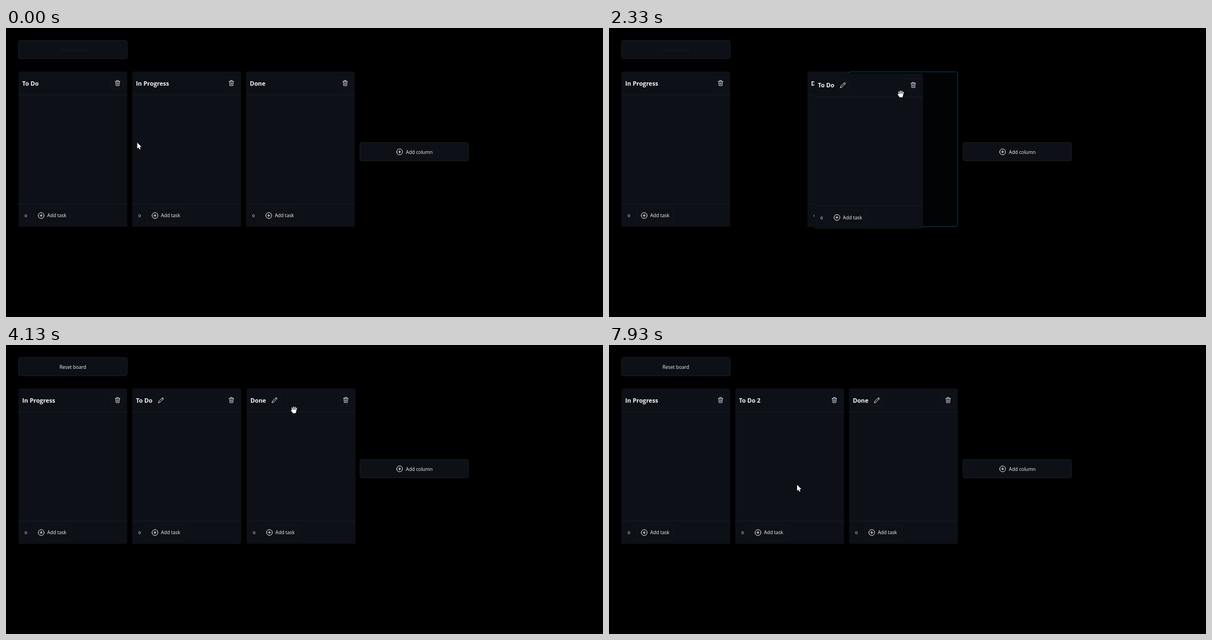
Recreate the animation shown at these times as an HTML page with a canvas. Size 1076 px wide and 521 px high, loop 8 s.

```html
<!DOCTYPE html>
<html lang="en">
<head>
<meta charset="utf-8">
<title>Task board</title>
<style>
html, body { margin: 0; width: 100%; height: 100%; overflow: hidden; background: #000; }
canvas { display: block; width: 100vw; height: 100vh; }
</style>
</head>
<body>
<canvas id="board" width="1076" height="521"></canvas>
<script>
const ctx = document.getElementById('board').getContext('2d');
const LOOP = 8000, STEP = 1000 / 15;
const FONT = '"Open Sans", "Noto Sans", sans-serif';
const TITLE = '700 10.8px ' + FONT, LABEL = '500 8.6px ' + FONT;
const PANEL = '#0d1117', LINE = '#171c23', EDGE = '#12171e', DIM = '#161b21', WHITE = '#f4f6f8';
const SLOT_X = 22.5, SLOT_W = 205.1, COL_Y = 78.5, COL_W = 196, COL_H = 280;

// Pointer path: time, x, y
const path = [
  [0, 236.5, 206.5], [70, 236.5, 206.5], [870, 150, 120], [1000, 178.5, 115.5], [1270, 178.5, 115.5],
  [1530, 243, 115], [1730, 302, 118.2], [2070, 404, 118], [2530, 578, 119.5], [2640, 578, 119.5],
  [2800, 517, 118], [3130, 294, 119.5], [3330, 294, 119.5], [3800, 519, 116], [4000, 519, 116],
  [4070, 519, 117], [4200, 519, 117], [4740, 287, 106], [4860, 287, 106], [5070, 313, 172],
  [6590, 313, 172], [7130, 387, 99], [7590, 387, 99], [7930, 339, 252], [8000, 339, 252]
];

// Column moves: time, slot
const columns = {
  todo: { moves: [[0, 0], [1660, 1], [2290, 2], [3530, 1]] },
  progress: { title: 'In Progress', moves: [[0, 1], [1660, 0]] },
  done: { title: 'Done', moves: [[0, 2], [2290, 1], [3530, 2]] }
};
const drags = [
  { id: 'todo', start: 1270, drop: 2630, from: 0, to: 2 },
  { id: 'done', start: 3330, drop: 3960, from: 1, to: 2 }
];
const DROP_MS = 250;
const EDIT_ON = 4795, EDIT_OFF = 7325;

const slotX = i => SLOT_X + i * SLOT_W;
const ease = p => 1 - Math.pow(1 - Math.min(1, Math.max(0, p)), 2.4);
const mix = (a, b, p) => a + (b - a) * p;
const within = (t, a, b) => t >= a && t < b;

// Monotone cubic through the path points
function track(t, k) {
  let i = 0;
  while (i < path.length - 2 && path[i + 1][0] <= t) i++;
  const rate = j => j < 0 || j > path.length - 2 ? 0 :
    (path[j + 1][k] - path[j][k]) / (path[j + 1][0] - path[j][0]);
  const slope = j => {
    const a = rate(j - 1), b = rate(j);
    return a * b > 0 ? 2 * a * b / (a + b) : 0;
  };
  const a = path[i], b = path[i + 1], h = b[0] - a[0], p = (t - a[0]) / h, q = 1 - p;
  return a[k] * (1 + 2 * p) * q * q + b[k] * (3 - 2 * p) * p * p
    + h * p * q * (slope(i) * q - slope(i + 1) * p);
}

function columnX(moves, t, snap) {
  let i = 0;
  while (i < moves.length - 1 && moves[i + 1][0] <= t) i++;
  const x = slotX(moves[i][1]);
  return i && !snap ? mix(slotX(moves[i - 1][1]), x, ease((t - moves[i][0]) / DROP_MS)) : x;
}

function box(x, y, w, h, fill, stroke, r = 3) {
  ctx.beginPath();
  ctx.roundRect(x, y, w, h, r);
  if (fill) { ctx.fillStyle = fill; ctx.fill(); }
  if (stroke) { ctx.strokeStyle = stroke; ctx.lineWidth = 1; ctx.stroke(); }
}

function text(str, x, y, font = LABEL, color = WHITE, align = 'left') {
  ctx.font = font;
  ctx.fillStyle = color;
  ctx.textAlign = align;
  ctx.fillText(str, x, y);
}

function strokePath(d, x, y, color = WHITE, width = 1) {
  ctx.save();
  ctx.translate(x, y);
  ctx.strokeStyle = color;
  ctx.lineWidth = width;
  ctx.lineCap = ctx.lineJoin = 'round';
  ctx.stroke(new Path2D(d));
  ctx.restore();
}

const icons = {
  trash: 'M-4.3 -3H4.3M-3.5 -3L-2.8 4.7H2.8L3.5 -3M-1.6 -3V-4.7H1.6V-3M-1.1 -1L-.9 2.8M1.1 -1L.9 2.8',
  pencil: 'M-4.7 4.7L-3.8 1.6L3 -4.5L4.7 -2.8L-1.8 3.8ZM1.6 -3.1L3.3 -1.4',
  check: 'M-3.7 .5L-1.3 3L3.7 -3',
  cross: 'M-3 -3L3 3M3 -3L-3 3',
  plus: 'M-5.3 0A5.3 5.3 0 1 0 5.3 0A5.3 5.3 0 1 0 -5.3 0M-2.2 0H2.2M0 -2.2V2.2'
};

function iconButton(name, x, y, color = '#e4e7ea', fill = PANEL) {
  box(x - 10.5, y - 10.5, 21, 21, fill, EDGE);
  strokePath(icons[name], x, y, color, name === 'trash' ? .9 : 1);
}

function drawColumn(x, y, title, pencil, edit) {
  ctx.save();
  ctx.translate(x, y);
  box(0, 0, COL_W, COL_H, PANEL);
  ctx.fillStyle = LINE;
  ctx.fillRect(0, 41.5, COL_W, 1);
  ctx.fillRect(0, 238.5, COL_W, 1);
  if (edit) {
    drawEditor(edit);
  } else {
    text(title, 6.7, 25.4, TITLE);
    if (pencil) iconButton('pencil', 6.7 + ctx.measureText(title).width + 15.5, 20.8);
    iconButton('trash', 178.6, 20.8);
  }
  text('0', 13.3, 262.7, '500 8px ' + FONT, WHITE, 'center');
  box(27.5, 246, 66, 27, PANEL, EDGE);
  strokePath(icons.plus, 40.9, 259.6);
  text('Add task', 51.7, 262.7);
  ctx.restore();
}

function drawEditor({ value, caret, ready, hover }) {
  box(7, 12.5, 124, 17, '#000', '#1587bd', 2);
  text(value, 11.8, 25.4, TITLE);
  if (caret) ctx.fillRect(Math.round(12 + ctx.measureText(value).width) + .5, 13, 1, 16);
  iconButton('check', 152.8, 20.8, ready ? WHITE : '#20262d', hover ? '#151b22' : PANEL);
  iconButton('cross', 178.6, 20.8);
}

function solid(d) {
  const p = new Path2D(d);
  ctx.lineJoin = 'round';
  ctx.lineWidth = 1;
  ctx.strokeStyle = '#000';
  ctx.stroke(p);
  ctx.fillStyle = '#fff';
  ctx.fill(p);
}

function drawCursor(x, y, kind) {
  ctx.save();
  ctx.translate(x, y);
  if (kind === 'arrow') {
    solid('M0 0V11L2.5 8.8L4.2 12.4L6 11.6L4.3 8.1H7.8Z');
  } else if (kind === 'hand') {
    const fingers = 'M-2.6 1L-3.6 -3.8M-.5 0L-.8 -5.3M1.6 0L2.2 -5M3.4 1L4.8 -3.2M-2.4 3L-4.9 .9';
    strokePath(fingers, 0, 0, '#000', 2.7);
    solid('M-3.5 0L4.3 0L4.1 2.5L3 6H-2L-4.2 2.5Z');
    strokePath(fingers, 0, 0, '#fff', 1.6);
  } else if (kind === 'pointer') {
    solid('M-1.5 -5Q-.3 -6.4 .8 -5V-1L5.5 .2Q6.7 .7 6.4 2.2L5.3 7H-.2L-3.8 2.3Q-3.5 .7 -1.5 2Z');
  } else {
    strokePath('M-2 -6H2M0 -6V6M-2 6H2', 0, 0, '#fff', 1);
  }
  ctx.restore();
}

function cursorKind(t, x, y, editing) {
  if (y >= 120) return 'arrow';
  if (editing) return x > 370 && x < 391 && y > 88 && y < 110 ? 'pointer' :
    x < 359 && y > 90 && y < 109 ? 'text' : 'hand';
  return within(t, 4660, EDIT_ON) ? 'pointer' : 'hand';
}

function render(t) {
  ctx.fillStyle = '#000';
  ctx.fillRect(0, 0, 1076, 521);
  const mx = track(t, 1), my = track(t, 2);
  const editing = within(t, EDIT_ON, EDIT_OFF);
  const kind = cursorKind(t, mx, my, editing);

  box(22.5, 22.5, 196, 33, PANEL, LINE);
  text('Reset board', 120.5, 42.6, LABEL, t >= 2660 ? WHITE : DIM, 'center');
  box(638, 206.5, 195.5, 33, PANEL, LINE);
  strokePath(icons.plus, 709.4, 223.3);
  text('Add column', 720.7, 226.5);

  const pencils = {
    todo: within(t, 925, 2920) || within(t, 3530, EDIT_ON) || (t >= EDIT_OFF && my < 120),
    done: t >= 2920
  };
  const edit = editing && {
    value: t < 5795 ? 'To Do' : t < 5995 ? 'To Do ' : 'To Do 2',
    caret: t < 5395 || within(t, 5795, 6595) || t >= 7125,
    ready: t >= 5795,
    hover: kind === 'pointer'
  };
  columns.todo.title = t < EDIT_OFF ? 'To Do' : 'To Do 2';

  const drag = drags.find(d => within(t, d.start, d.drop + DROP_MS));
  for (const [id, col] of Object.entries(columns)) {
    if (drag && drag.id === id) continue;
    drawColumn(columnX(col.moves, t), COL_Y, col.title, pencils[id], id === 'todo' && edit);
  }
  if (drag) {
    const col = columns[drag.id];
    const held = Math.min(t, drag.drop);
    let x = slotX(drag.from) + track(held, 1) - track(drag.start, 1);
    let y = COL_Y + track(held, 2) - track(drag.start, 2);
    if (t < drag.drop) {
      box(columnX(col.moves, t, true) + .5, COL_Y + .5, COL_W - 1, COL_H - 1, '#020305', '#09465c');
    } else {
      const p = ease((t - drag.drop) / DROP_MS);
      x = mix(x, slotX(drag.to), p);
      y = mix(y, COL_Y, p);
    }
    drawColumn(x, y, col.title, pencils[drag.id]);
  }
  drawCursor(mx, my, kind);
}

const begin = performance.now();
function tick() {
  const t = (performance.now() - begin) % LOOP;
  render(Math.min(LOOP - 1, Math.floor((t + 5) / STEP) * STEP));
  requestAnimationFrame(tick);
}
tick();
</script>
</body>
</html>
```
